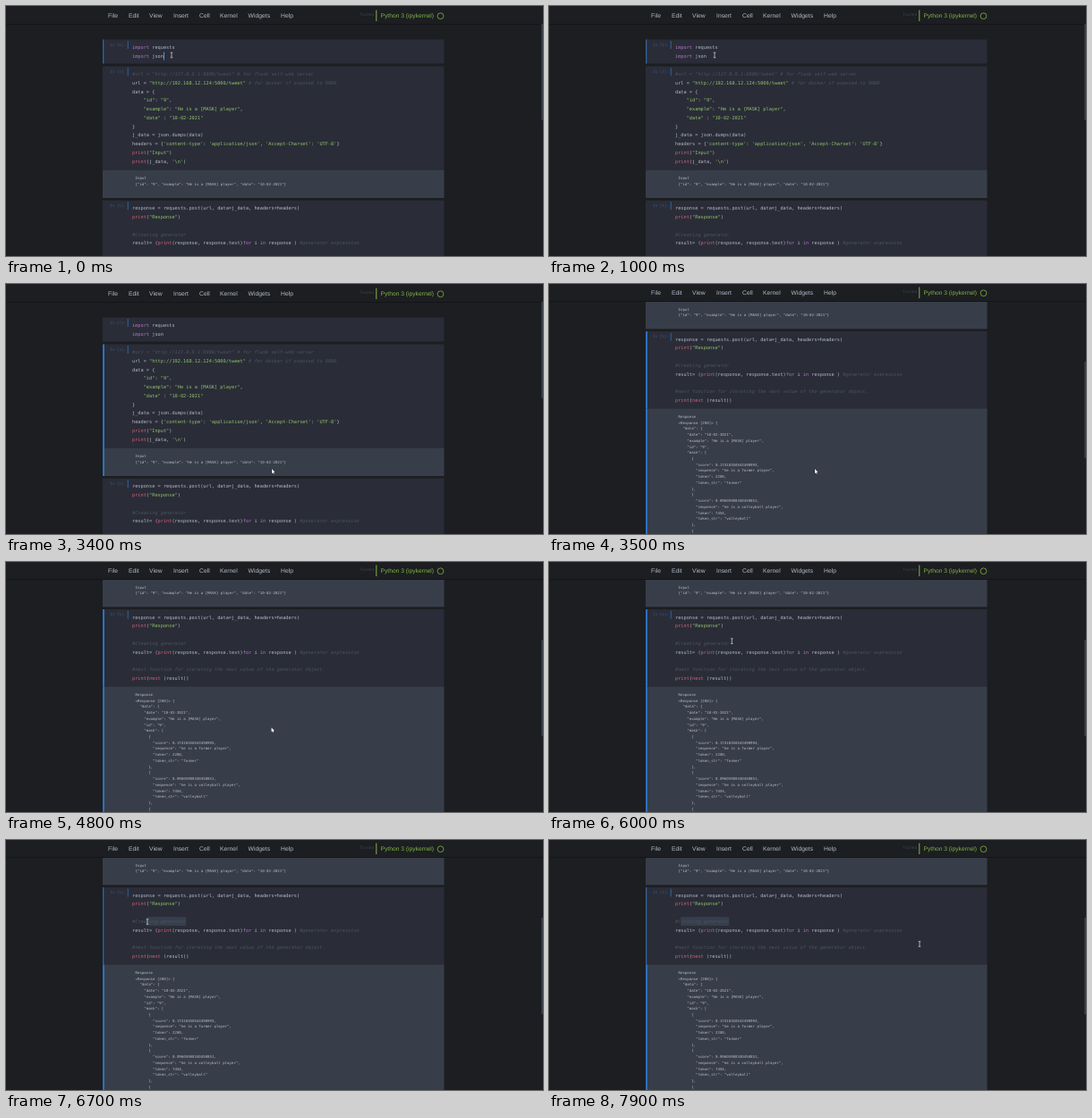
Recreate the animation shown at these times as an HTML page with a canvas. Size 600 px wide and 280 px high, loop 8000 ms.

```html
<!DOCTYPE html>
<html lang="en">
<head>
<meta charset="utf-8">
<title>Notebook run</title>
<style>
html, body { margin: 0; width: 100%; height: 100%; overflow: hidden; background: #1c1e21; }
canvas { display: block; width: 600px; height: 280px; }
</style>
</head>
<body>
<canvas id="stage" width="600" height="280"></canvas>
<script>
const ctx = document.getElementById('stage').getContext('2d');
const LOOP = 8000, RUN = 2500, SCROLL = 3500, CLICK = 6300;
const MONO = '"DejaVu Sans Mono", "Noto Sans Mono", monospace';
const SANS = '"Liberation Sans", Arial, sans-serif';
const CODE = 5.27, OUT = 4.06, ADV = CODE * 0.602;
const LEFT = 108, RIGHT = 489.5, CODE_X = 141;
const C = {
  page: '#1c1e21', cell: '#2a2d38', out: '#383e49', line: '#141518',
  text: '#b4bac6', outText: '#b9bec7', comment: '#4c535f', string: '#94c46c',
  keyword: '#b873cc', call: '#dc5f78', prompt: '#3c5577', blue: '#2b70c2',
  edit: '#34639c', sel: '#373f4c', menu: '#b3bbc9', green: '#80b548', dim: '#3b414a'
};

const cells = [
  { y: 37.5, split: 64.5, end: 64.5, code: ['import requests', 'import json'], out: [] },
  { y: 67.5, split: 183.8, end: 215, code: [
    '#url = "http://127.0.0.1:8000/tweet" # for flask self-web server',
    'url = "http://192.168.12.124:5000/tweet" # for docker if exposed to 9000',
    'data = {',
    '    "id": "9",',
    '    "example": "He is a [MASK] player",',
    '    "date" : "10-02-2021"',
    '}',
    'j_data = json.dumps(data)',
    "headers = {'content-type': 'application/json', 'Accept-Charset': 'UTF-8'}",
    'print("Input")',
    "print(j_data, '\\n')"
  ], out: ['Input', '{"id": "9", "example": "He is a [MASK] player", "date": "10-02-2021"}'] },
  { y: 217.7, split: 304.2, end: 620, code: [
    'response = requests.post(url, data=j_data, headers=headers)',
    'print("Response")',
    '',
    '#Creating generator',
    'result= (print(response, response.text)for i in response ) #generator expression',
    '',
    '#next function for iterating the next value of the generator object.',
    'print(next (result))'
  ], out: [
    'Response', '<Response [200]> {', '  "data": {', '    "date": "10-02-2021",',
    '    "example": "He is a [MASK] player",', '    "id": "9",', '    "mask": [',
    ...guess('0.17418350543498993', 'former', 2280),
    ...guess('0.09605988340450851', 'volleyball', 7454),
    '      {'
  ] }
];

function guess(score, word, token) {
  const pad = ' '.repeat(8);
  return ['      {', `${pad}"score": ${score},`, `${pad}"sequence": "he is a ${word} player",`,
    `${pad}"token": ${token},`, `${pad}"token_str": "${word}"`, '      },'];
}

function rect(x, y, w, h, color) {
  ctx.fillStyle = color;
  ctx.fillRect(x, y, w, h);
}

// Large glyphs scaled down keep fractional advances.
function text(s, x, y, size, color, family = MONO, style = '') {
  ctx.save();
  ctx.translate(x, y);
  ctx.scale(0.1, 0.1);
  ctx.font = `${style} ${size * 10}px ${family}`;
  ctx.textRendering = 'geometricPrecision';
  ctx.fillStyle = color;
  ctx.fillText(s, 0, 0);
  ctx.restore();
}

function codeLine(s, y) {
  const tokens = /(#.*)|("[^"]*"|'[^']*')|\b(import|for|in)\b|\b(print|next)\b|[^\s"'#]+?(?=\b|\W)|\S/g;
  for (const m of s.matchAll(tokens)) {
    const color = m[1] ? C.comment : m[2] ? C.string : m[3] ? C.keyword : m[4] ? C.call : C.text;
    text(m[0], CODE_X + m.index * ADV, y, CODE, color, MONO, m[1] ? 'italic' : '');
  }
}

function drawCell(cell, label, mode, selFrom) {
  const { y, split, end } = cell;
  rect(LEFT, y, RIGHT - LEFT, split - y, C.cell);
  if (end > split) rect(LEFT, split, RIGHT - LEFT, end - split, C.out);
  if (mode) {
    const edit = mode === 'edit';
    rect(LEFT, y, edit ? 1.3 : 2, split - y, edit ? C.edit : C.blue);
    if (end > split) rect(LEFT, split, 2, end - split, C.blue);
  }
  text(`In [${label}]:`, 116, y + 7, 4.3, C.prompt);
  rect(135.7, y + 1.5, 1, 9, C.edit);
  if (selFrom < 19) {
    rect(CODE_X + selFrom * ADV, y + 33.2, (19 - selFrom) * ADV, 9.8, C.sel);
  }
  cell.code.forEach((s, i) => codeLine(s, y + 10.5 + i * 9.77));
  cell.out.forEach((s, i) => text(s, 144.5, split + 10.4 + i * 6.73, OUT, C.outText));
}

function header(scrolled) {
  const dy = scrolled ? -1 : 0;
  rect(0, 0, 600, 21 + dy, C.page);
  rect(0, 20 + dy, 600, 1, C.line);
  const items = [['File', 114], ['Edit', 137], ['View', 160], ['Insert', 187], ['Cell', 216],
    ['Kernel', 239], ['Widgets', 270.5], ['Help', 307]];
  for (const [s, x] of items) text(s, x, 13.3 + dy, 6.8, C.menu, SANS);
  text('Trusted', 395, 11.2 + dy, 4.8, C.dim, SANS);
  rect(413.3, 4.5 + dy, 1, 12.5, C.green);
  text('Python 3 (ipykernel)', 418.5, 13.2 + dy, 6.7, C.green, SANS);
  ctx.strokeStyle = C.green;
  ctx.lineWidth = 0.8;
  ctx.beginPath();
  ctx.arc(485.5, 11.2 + dy, 3.4, 0, Math.PI * 2);
  ctx.stroke();
}

// time, x, y
const path = [
  [0, 185, 55], [1000, 185, 55], [1750, 298, 210], [4400, 298, 210], [4500, 298, 207],
  [5400, 296, 135], [5950, 204.5, 88.5], [6300, 202, 90], [6700, 158, 91.5],
  [6950, 145, 92], [7250, 146, 94], [7800, 414, 116.5], [8000, 414, 116.5]
];

function mouseAt(t) {
  let i = 1;
  while (path[i][0] < t) i++;
  const [t0, x0, y0] = path[i - 1], [t1, x1, y1] = path[i];
  let k = (t - t0) / (t1 - t0);
  if (i !== 8) k = k * k * (3 - 2 * k);
  return [x0 + (x1 - x0) * k, y0 + (y1 - y0) * k];
}

function drawMouse(x, y, beam) {
  ctx.save();
  ctx.translate(x, y);
  ctx.beginPath();
  if (beam) {
    ctx.strokeStyle = '#c3c8d0';
    ctx.lineWidth = 0.8;
    for (const s of [-1, 1]) {
      ctx.moveTo(-1.3, s * 2.8);
      ctx.lineTo(1.3, s * 2.8);
    }
    ctx.moveTo(0, -2.8);
    ctx.lineTo(0, 2.8);
    ctx.stroke();
  } else {
    const pts = [[-1, -3], [-1, 2.2], [0.2, 1.2], [1, 3], [1.8, 2.6], [1.1, 0.9], [2.6, 0.8]];
    for (const p of pts) ctx.lineTo(...p);
    ctx.closePath();
    ctx.strokeStyle = '#15171b';
    ctx.lineWidth = 0.8;
    ctx.stroke();
    ctx.fillStyle = '#f0f1f3';
    ctx.fill();
  }
  ctx.restore();
}

function draw(t) {
  const scrolled = t >= SCROLL;
  const shift = scrolled ? 164.7 : 0;
  const [mx, my] = mouseAt(t);
  const reach = mouseAt(Math.min(t, 7200))[0];
  const selFrom = t < CLICK ? 19 : Math.max(1, Math.min(19, Math.round((reach - CODE_X) / ADV)));
  const modes = ['', '', ''];
  if (t < RUN) modes[0] = 'edit';
  else if (!scrolled) modes[1] = 'command';
  else modes[2] = t < CLICK ? 'command' : 'edit';

  rect(0, 0, 600, 280, C.page);
  ctx.save();
  ctx.translate(0, -shift);
  drawCell(cells[0], t < RUN ? 6 : 7, modes[0], 19);
  drawCell(cells[1], 3, modes[1], 19);
  drawCell(cells[2], 5, modes[2], selFrom);
  if (t < RUN && t % 1060 < 530) rect(176, 51.5, 1, 9, '#5d8fd0');
  ctx.restore();

  header(scrolled);
  rect(598.3, scrolled ? 87 : 20, 1.7, 108, '#3b414c');
  drawMouse(mx, my, my < (scrolled ? 139.5 : 183.8));
}

const start = performance.now();
function tick() {
  draw((performance.now() - start) % LOOP);
  requestAnimationFrame(tick);
}
tick();
</script>
</body>
</html>
```
